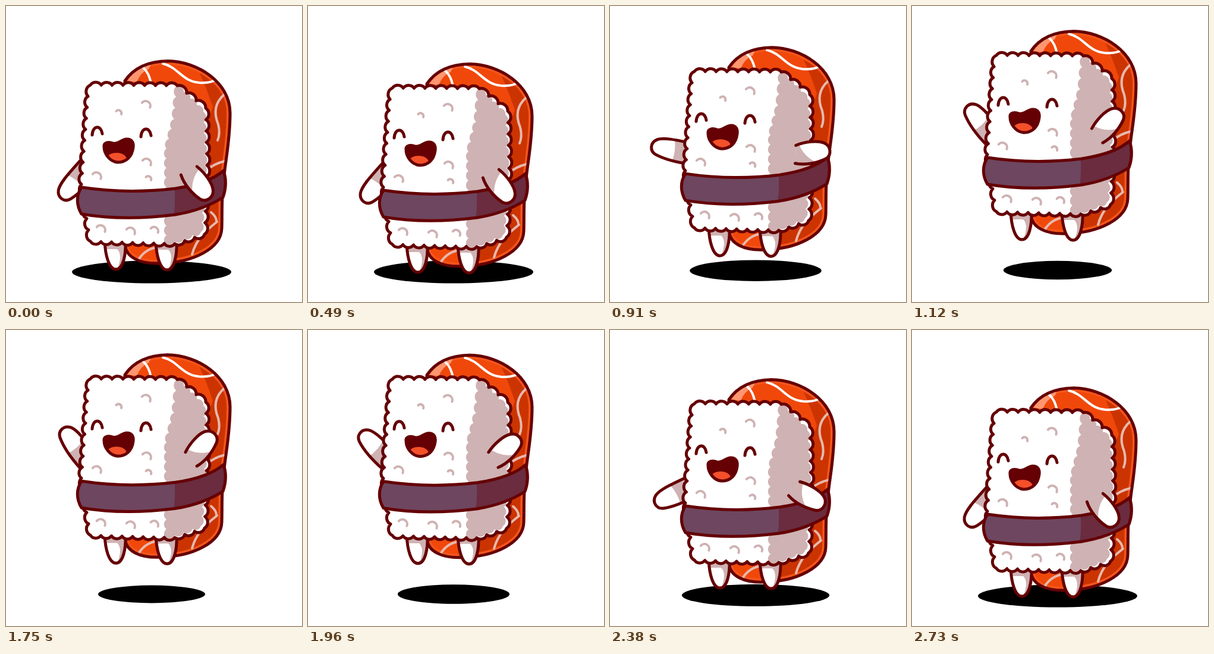
Recreate the animation shown at these times as an HTML page. Size 498 by 498 pixels, loop 3.22 s.

```html
<!DOCTYPE html>
<html lang="en">
<head>
<meta charset="utf-8">
<title>Jumping sushi</title>
<style>
  html, body { margin: 0; width: 100%; height: 100%; overflow: hidden; background: #fff; }
  svg { display: block; width: 100vw; height: 100vh; }
  .line { fill: none; stroke: #650004; stroke-width: 5; stroke-linecap: round; stroke-linejoin: round; }
  .white { fill: #fff; }
  .shade { fill: #cfb2b3; }
  .grain { fill: none; stroke: #cfb2b3; stroke-width: 4; stroke-linecap: round; }
  .vein { fill: none; stroke: #fff; stroke-width: 4; stroke-linecap: round; }
  .dim { stroke: #e6b9ae; }
</style>
</head>
<body>
<svg viewBox="0 0 498 498">
  <defs>
    <path id="slab" d="M200 126C215 104 240 93 272 92.5C322 93 377 128 377 180C377 225 370 255 367 285C362 320 364 345 363 374C362 408 315 432 258 433C225 434 203 423 200 403Z"/>
    <path id="rice"/>
    <path id="band" d="M127 305C180 313 235 313 285 307C325 301 350 291 366 277C371 292 370 308 365 322C340 338 310 347 285 351C230 358 175 358 127 350C118 335 118 318 127 305Z"/>
    <path id="mouth" d="M165 237C164 229 173 228 180 231C188 233 194 225 202 224C212 223 215 230 214 238C212 254 202 263 188 263C174 262 165 248 165 237Z"/>
    <path id="armL" d="M0 -17C-30 -18 -52 -19 -62 -13C-73 -6 -71 8 -60 12C-42 18 -20 19 0 18"/>
    <path id="armR" d="M8 -13C25 -18 45 -18 55 -13C67 -7 67 9 56 14C40 20 20 22 4 17"/>
    <path id="leg" d="M-18 -48C-17 -24 -11 0 1 0C13 0 18 -24 17 -48"/>
  </defs>
  <ellipse id="shadow" cx="245"/>
  <g id="body">
    <g data-clip="slab">
      <use href="#slab" fill="#cb3400"/>
      <path d="M190 80H308Q330 115 348 170L270 380Q262 410 268 440H190Z" fill="#f0480a"/>
      <use href="#slab" fill="none" stroke="#f4551b" stroke-width="12"/>
      <path d="M204 126Q220 103 244 98L240 106Q226 112 220 128Z" fill="#ff9670"/>
      <path class="vein" d="M264 97C290 103 295 126 325 129C340 130 350 127 356 122M231 104C238 110 242 120 244 130"/>
      <path class="vein dim" d="M367 149C350 164 350 182 357 199C360 211 359 219 356 226M368 261C355 264 346 269 338 276M345 347C351 352 354 358 354 362M355 363C336 378 320 392 313 418M224 425C233 412 243 407 256 406"/>
    </g>
    <use href="#slab" class="line"/>
    <g class="leg" transform="translate(184 443)"></g>
    <g class="leg" transform="translate(270 444)"></g>
    <g id="left">
      <g data-clip="armL">
        <use href="#armL" class="white"/>
        <path class="shade" d="M0 -22H-34Q-26 0 -32 22H0Z"/>
      </g>
      <use href="#armL" class="line"/>
    </g>
    <g data-clip="rice">
      <use href="#rice" class="white"/>
      <path id="side" class="shade"/>
    </g>
    <g id="grains" class="grain"></g>
    <use href="#rice" class="line"/>
    <path id="eye" class="line" d="M145 217C146 200 160 200 162 215"/>
    <use href="#eye" x="82" y="3"/>
    <g data-clip="mouth">
      <use href="#mouth" fill="#650004"/>
      <ellipse cx="186" cy="258" rx="17" ry="11" fill="#f4502a"/>
    </g>
    <use href="#mouth" class="line"/>
    <g data-clip="band">
      <use href="#band" fill="#6e465f"/>
      <path d="M281 290Q288 325 280 365H380V260H300Z" fill="#6a2c3e"/>
    </g>
    <use href="#band" class="line"/>
    <g id="right">
      <g data-clip="armR">
        <use href="#armR" class="white"/>
        <path class="shade" d="M-10 -22H12Q16 8 46 22H-10Z"/>
      </g>
      <use href="#armR" class="line"/>
    </g>
  </g>
</svg>
<script>
const NS = 'http://www.w3.org/2000/svg';
const $ = id => document.getElementById(id);
const add = (parent, tag, attrs) => {
  const el = document.createElementNS(NS, tag);
  for (const k in attrs) el.setAttribute(k, attrs[k]);
  return parent.appendChild(el);
};

// Polygon whose edges are split into round bumps of about the given size
function scallop(size, [[x, y], ...rest]) {
  let d = `M${x} ${y}`;
  for (const [px, py] of rest) {
    const len = Math.hypot(px - x, py - y);
    const n = Math.max(1, Math.round(len / size));
    const r = len / n * 0.61;
    for (let i = 1; i <= n; i++) {
      d += `A${r} ${r} 0 0 1 ${x + (px - x) * i / n} ${y + (py - y) * i / n}`;
    }
    [x, y] = [px, py];
  }
  return d + 'Z';
}

$('rice').setAttribute('d', scallop(18, [
  [142, 133], [288, 134], [336, 172], [338, 268], [334, 384],
  [284, 400], [142, 396], [127, 300], [138, 152], [142, 133]
]));
$('side').setAttribute('d', scallop(17, [
  [288, 134], [332, 178], [334, 268], [328, 380], [270, 402],
  [270, 240], [283, 190], [288, 134]
]));

for (const [x, y, r] of [[236, 166, 8], [190, 179, 5], [237, 263, 8], [240, 290, 5],
  [153, 286, 8], [160, 375, 8], [210, 379, 8], [250, 377, 7]]) {
  add($('grains'), 'path', {
    d: `M${x - r * .9} ${y - r * .4}A${r} ${r} 0 0 1 ${x + r * .8} ${y + r * .6}`
  });
}

for (const leg of document.querySelectorAll('.leg')) {
  leg.innerHTML = `<g data-clip="leg"><use href="#leg" class="white"/>
    <path class="shade" d="M-24 -54H24V0H3Q13 -24 3 -34H-24Z"/></g>
    <use href="#leg" class="line"/>`;
}

for (const g of document.querySelectorAll('[data-clip]')) {
  const name = g.dataset.clip, id = name + 'Clip';
  if (!$(id)) {
    const clip = add(document.querySelector('defs'), 'clipPath', { id });
    add(clip, 'use', { href: '#' + name });
  }
  g.setAttribute('clip-path', `url(#${id})`);
}

const LOOP = 3220, STEP = 70;

// Sine ease from 0 to 1, clamped at both ends
const ease = (t, start, length) => {
  const p = Math.min(1, Math.max(0, (t - start) / length));
  return (1 - Math.cos(Math.PI * p)) / 2;
};
// 0 on the ground, 1 in the air
const jump = (t, up, upTime, down, downTime) => ease(t, up, upTime) - ease(t, down, downTime);

function draw(now) {
  const t = Math.floor(now % LOOP / STEP) * STEP;
  const y = 5 * ease(t, 0, 420) - 55.7 * jump(t, 665, 490, 1920, 690);
  const raise = jump(t, 575, 600, 1820, 820);
  const low = 1 - jump(t, 620, 560, 1790, 860);
  $('body').setAttribute('transform', `translate(0 ${y})`);
  $('left').setAttribute('transform', `translate(138 271) rotate(${101 * raise - 50})`);
  $('right').setAttribute('transform', `translate(306 271) rotate(${55 - 102 * raise})`);
  $('shadow').setAttribute('rx', 90 + 44 * low);
  $('shadow').setAttribute('ry', 15 + 4 * Math.sqrt(low));
  $('shadow').setAttribute('cy', 444.5 + 3 * low * low);
}

const start = performance.now();
function tick() {
  draw(performance.now() - start);
  requestAnimationFrame(tick);
}
tick();
</script>
</body>
</html>
```
